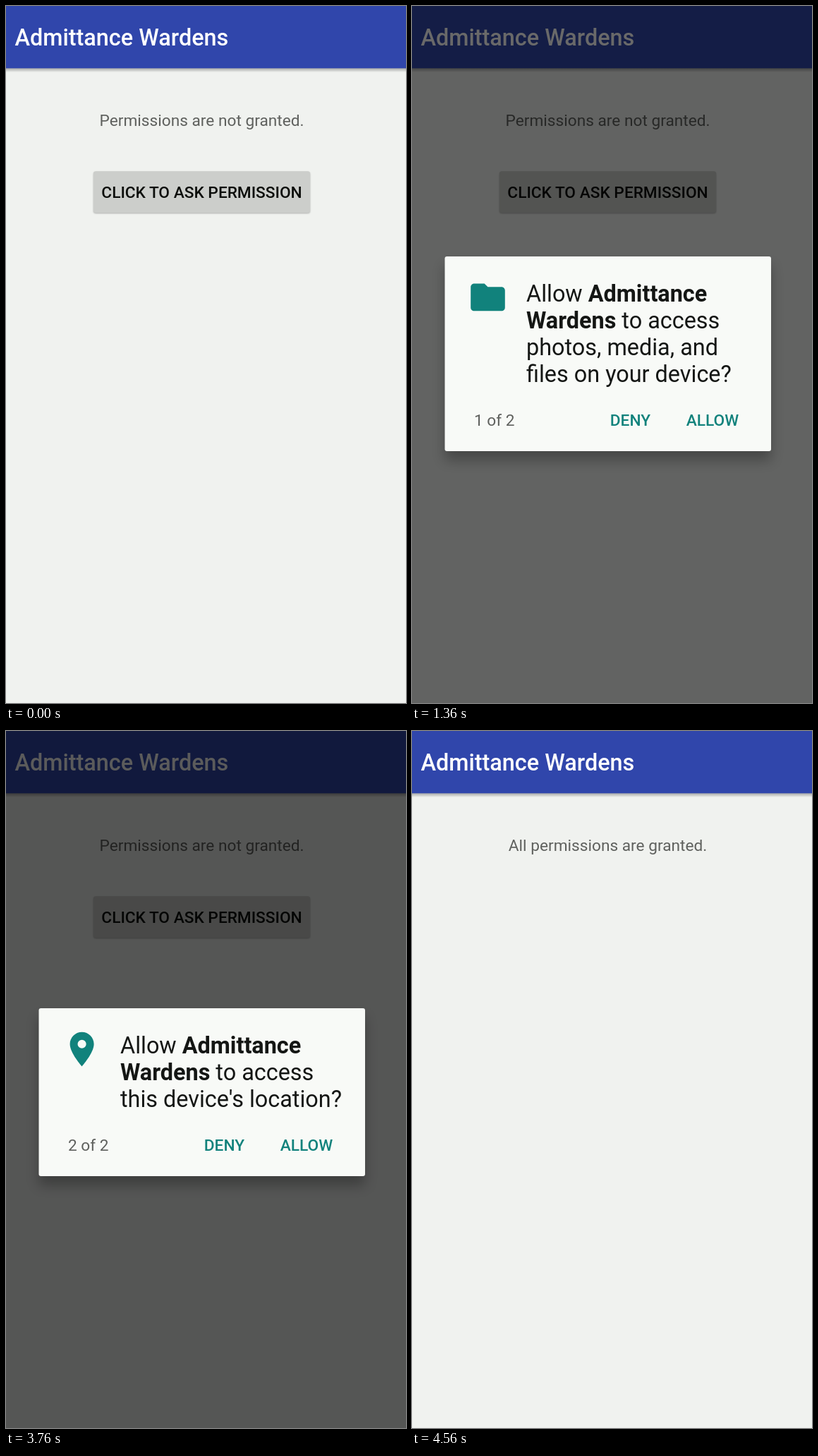
An HTML page that plays this animation: 567x988 px, repeating every 6000 ms.

```html
<!DOCTYPE html>
<html lang="en">
<head>
<meta charset="utf-8">
<title>Permission dialog</title>
<style>
  html, body { margin: 0; width: 100%; height: 100%; overflow: hidden; background: #f0f2ef; }
  svg { display: block; width: 100vw; height: 100vh; }
  text { font-family: Roboto, sans-serif; font-size: 22.68px; white-space: pre; }
  .big { font-size: 32.4px; }
  .medium { font-weight: 500; }
  .mid { text-anchor: middle; }
  .teal { fill: #11827c; }
  .ink { fill: #141614; }
  .grey { fill: #5f615e; }
  .bold { font-weight: 700; }
</style>
</head>
<body>
<svg viewBox="0 0 567 988" preserveAspectRatio="none">
  <defs>
    <linearGradient id="edge" x1="0" y1="0" x2="0" y2="1">
      <stop offset="0" stop-color="#000" stop-opacity=".3"/>
      <stop offset=".5" stop-color="#000" stop-opacity=".16"/>
      <stop offset="1" stop-color="#000" stop-opacity="0"/>
    </linearGradient>
    <filter id="soft" x="-20%" y="-30%" width="140%" height="160%"><feGaussianBlur stdDeviation="9"/></filter>
    <filter id="fine" x="-5%" y="-20%" width="110%" height="140%"><feGaussianBlur stdDeviation="1.3"/></filter>
  </defs>

  <rect width="567" height="988" fill="#f0f2ef"/>
  <rect y="88" width="567" height="6" fill="url(#edge)"/>
  <rect width="567" height="88.3" fill="#3046ab"/>
  <text class="big medium" x="12.4" y="55.5" fill="#fff">Admittance Wardens</text>
  <text id="status" class="mid grey" x="277.5" y="170.4"></text>

  <g id="ask">
    <rect id="askShadow" x="124" y="235.5" width="307" height="58.5" rx="3.2" opacity=".28" filter="url(#fine)"/>
    <rect x="124" y="234.3" width="307" height="58.6" rx="3.2" fill="#cccecb"/>
    <rect id="askPress" x="124" y="234.3" width="307" height="58.6" rx="3.2"/>
    <text class="mid medium" x="277.5" y="272" fill="#0b0d0a">CLICK TO ASK PERMISSION</text>
  </g>

  <rect id="dim" width="567" height="988"/>

  <g id="dialog">
    <rect id="shadow" x="46.5" width="462.5" rx="3" opacity=".28" filter="url(#soft)"/>
    <rect id="card" x="46.5" width="462.5" rx="3" fill="#f8faf7"/>
    <g id="files">
      <path id="folder" class="teal" d="M10 4H4c-1.1 0-1.99.9-1.99 2L2 18c0 1.1.9 2 2 2h16c1.1 0 2-.9 2-2V8c0-1.1-.9-2-2-2h-8z"/>
      <text class="big ink" x="162" y="418.8">Allow <tspan class="bold">Admittance</tspan></text>
      <text class="big ink" x="162" y="456.8"><tspan class="bold">Wardens</tspan> to access</text>
      <text class="big ink" x="162" y="494.8">photos, media, and</text>
      <text class="big ink" x="162" y="532.8">files on your device?</text>
    </g>
    <g id="place">
      <path id="pin" class="teal" fill-rule="evenodd" d="M12 2C8.13 2 5 5.13 5 9c0 5.25 7 13 7 13s7-7.75 7-13c0-3.87-3.13-7-7-7zm0 9.5a2.5 2.5 0 1 1 0-5 2.5 2.5 0 0 1 0 5z"/>
      <text class="big ink" x="162" y="456.8">Allow <tspan class="bold">Admittance</tspan></text>
      <text class="big ink" x="162" y="494.8"><tspan class="bold">Wardens</tspan> to access</text>
      <text class="big ink" x="162" y="532.8">this device's location?</text>
    </g>
    <rect id="allowPress" x="374.5" y="557.5" width="102.5" height="57.5" rx="3.2"/>
    <text id="count" class="grey" x="88" y="595"></text>
    <text class="mid medium teal" x="309.4" y="595">DENY</text>
    <text class="mid medium teal" x="425.9" y="595">ALLOW</text>
  </g>

  <g id="touch" fill="#fff">
    <circle r="22" opacity=".15"/>
    <circle r="16.5" opacity=".35"/>
  </g>
</svg>
<script>
const LOOP = 6000, STEP = 80;
const el = {};
document.querySelectorAll('svg [id]').forEach(n => el[n.id] = n);

const set = (n, attrs) => { for (const k in attrs) n.setAttribute(k, attrs[k]); };
const fade = (n, v) => set(n, { opacity: v, visibility: v > 0 ? 'visible' : 'hidden' });

// Linear value at t through [time, value] pairs.
function track(t, keys) {
  if (t <= keys[0][0]) return keys[0][1];
  for (let i = 1; i < keys.length; i++) {
    const [a, u] = keys[i - 1], [b, v] = keys[i];
    if (t <= b) return u + (v - u) * (t - a) / (b - a);
  }
  return keys[keys.length - 1][1];
}

const DIM = [[1120, 0], [1200, .058], [1280, .33], [1360, .59], [1440, .645],
  [4000, .645], [4080, .6], [4160, .504], [4240, .33], [4320, .18], [4400, .08], [4480, .03], [4560, 0]];
const DIALOG = [[1040, 0], [1200, .6], [1280, .88], [1360, 1], [4000, 1], [4160, 0]];
const ASK = [[400, 0], [560, .1], [960, .1], [1200, .04], [1440, 0]];
const ALLOW = [[2320, 0], [2480, .1], [2800, .1], [3120, 0], [3840, 0], [3920, .1]];
const TAPS = [
  { x: 330, y: 264, keys: [[320, 0], [400, 1], [720, 1], [880, 0]] },
  { x: 431, y: 584, keys: [[2240, 0], [2320, 1], [2480, 1], [2640, 0]] },
  { x: 431, y: 584, keys: [[3760, 0], [3840, 1], [4000, 1], [4160, .28], [4240, 0]] }
];

function icon(n, x, y, s) {
  set(n, { transform: `translate(${x} ${y}) scale(${2.43 * s}) translate(-12 -12)` });
}

function render(t) {
  const granted = t >= 4080, second = t >= 2880;
  el.status.textContent = granted ? 'All permissions are granted.' : 'Permissions are not granted.';
  fade(el.ask, granted ? 0 : 1);
  fade(el.askPress, track(t, ASK));
  fade(el.dim, track(t, DIM));
  fade(el.dialog, track(t, DIALOG));

  const top = second ? 393 : 355, height = 631 - top;
  set(el.card, { y: top, height });
  set(el.shadow, { y: top + 13, height });
  el.count.textContent = second ? '2 of 2' : '1 of 2';

  const out = track(t, [[2560, 1], [2880, 0]]);
  const into = track(t, [[2880, 0], [3200, 1]]);
  fade(el.files, out);
  fade(el.place, into);
  // Hidden children must follow a hidden dialog.
  el.dialog.style.display = track(t, DIALOG) > 0 ? '' : 'none';
  icon(el.folder, 107.5, 412.9, out);
  icon(el.pin, 107.6, 451, into);
  fade(el.allowPress, track(t, ALLOW));

  const tap = TAPS.find(p => track(t, p.keys) > 0);
  fade(el.touch, tap ? track(t, tap.keys) : 0);
  if (tap) set(el.touch, { transform: `translate(${tap.x} ${tap.y})` });
}

const start = performance.now();
function tick() {
  const t = (performance.now() - start) % LOOP;
  render(Math.floor(t / STEP) * STEP);
  requestAnimationFrame(tick);
}
tick();
</script>
</body>
</html>
```
